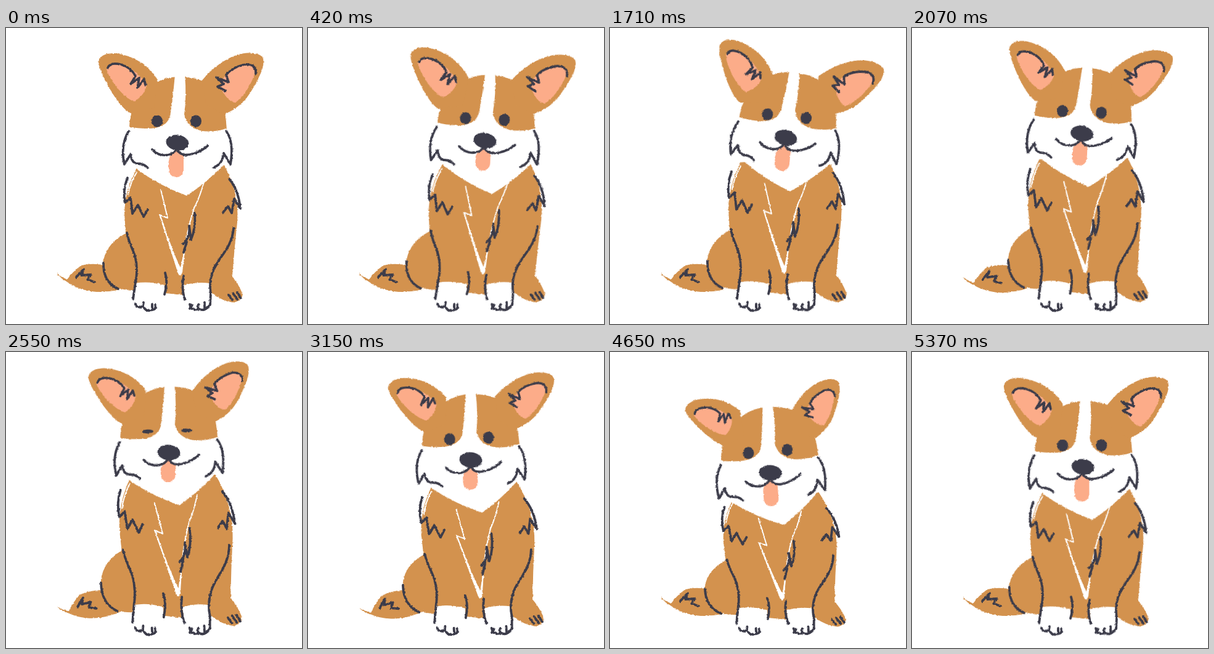
An HTML page for the animation above (5.4 s loop, 480 px wide and 480 px high).

```html
<!DOCTYPE html>
<html lang="en">
<head>
<meta charset="utf-8">
<title>Happy dog</title>
<style>
  html, body { margin: 0; width: 100%; height: 100%; overflow: hidden; background: #fff; }
  svg { display: block; width: 100%; height: 100%; }
  .fur { fill: #d3924e; }
  .white { fill: #fff; }
  .pink { fill: #fcac89; }
  .dark { fill: #3c3c4a; }
  .ink, .hair { fill: none; stroke: #3c3c4a; stroke-width: 3.8; stroke-linecap: round; stroke-linejoin: round; }
  .hair { stroke: #fff; stroke-width: 2; }
</style>
</head>
<body>
<svg viewBox="0 0 480 480">
  <filter id="brush" filterUnits="userSpaceOnUse" x="0" y="0" width="480" height="480" color-interpolation-filters="sRGB">
    <feTurbulence type="fractalNoise" baseFrequency=".3" numOctaves="2" seed="4"/>
    <feDisplacementMap in="SourceGraphic" scale="3" xChannelSelector="R" yChannelSelector="G"/>
  </filter>
  <g filter="url(#brush)">
    <g id="tail">
      <path class="fur" d="M82 397Q90 404 99 408Q108 395 122 385Q142 380 166 386L185 424Q150 432 125 424Q110 420 98 411Q88 406 82 397Z"/>
      <path class="ink" d="M114 404L126 391 122 401 137 400 132 408 144 412"/>
    </g>

    <g id="body">
      <path class="fur" d="M212 228Q193 262 192 300L194 333Q158 352 157 387Q160 426 207 425L258 430 288 433 334 430Q352 444 370 445Q382 442 384 432Q376 413 367 403Q370 360 375 315Q379 265 351 218Z"/>
      <path class="white" d="M209 414Q232 410 257 417L257 434 243 458H205ZM288 417Q310 411 331 414L333 458H292Z"/>
      <path class="hair" d="M212 234Q201 252 198 270M207 236L197 255M251 262L262 308 249 303M321 250Q314 275 305 292Q296 320 292 345L284 394"/>
      <path class="white" d="M248 302L262 345 279 398Q283 405 286 396L292 345 283 389Q270 362 251 304Z"/>
      <path class="ink" d="M197 243Q189 262 193 283L202 275 205 301 214 287 223 306 230 294M362 245Q377 262 380 293L370 277 366 300 360 289 352 299"/>
      <path class="ink" d="M306 300Q308 325 300 343L297 321Q299 340 287 350M293 347L288 364"/>
      <path class="ink" d="M196 332C201 357 212 364 212 392Q212 404 210 412L206 440M258 397Q263 411 257 432M288 402Q284 423 290 440M369 325C366 360 341 374 335 396Q329 413 332 430L331 449M158 381Q157 412 182 423"/>
      <path class="ink" d="M210 447Q211 456 222 451L223 445M223 452Q227 461 237 457L237 448M237 456Q244 458 242 448M298 448Q300 459 311 456L312 448M312 455Q321 461 330 450M298 455L302 449M322 445L322 454"/>
      <path class="ink" d="M361 433L367 441M368 430L375 440M375 429L381 438"/>
    </g>

    <g id="head">
      <path class="fur" d="M200 170Q199 140 211 120Q238 79 281 79Q327 80 346 108Q357 130 358 170Z"/>
      <g id="earL">
        <path class="fur" d="M202 138Q190 133 172 105Q150 68 150 54Q154 40 178 41Q222 47 246 84L240 130Z"/>
        <path class="pink" d="M163 66Q168 55 188 58Q214 70 228 92Q226 108 208 119Q197 116 182 99Q165 78 163 66Z"/>
        <path class="ink" d="M165 65Q168 55 186 59Q203 64 210 78L202 91 216 81 213 97 224 83 226 92"/>
      </g>
      <g id="earR">
        <path class="fur" d="M317 86Q345 52 380 42Q405 37 416 47Q421 58 410 80Q392 117 375 128Q362 137 353 140L325 125Z"/>
        <path class="pink" d="M357 76Q370 60 395 58Q407 60 402 78Q390 108 372 121Q360 120 350 100Q345 88 357 76Z"/>
        <path class="ink" d="M405 74Q406 58 388 59Q366 64 357 76L361 88 341 80 353 91 343 95 356 102"/>
      </g>
      <path class="white" d="M274 76Q270 120 266 143Q260 163 230 163Q212 163 200 160Q184 190 192 217Q203 219 215 231Q250 256 293 272Q325 251 352 223L364 216Q371 185 357 163Q340 169 318 167Q293 162 289 140Q293 110 290 76Z"/>
      <path class="ink" d="M199 167Q185 190 192 221L202 205Q204 220 214 220Q224 220 230 227M357 167Q370 185 364 221L353 203Q351 221 337 226"/>
      <ellipse class="dark eye" cx="245" cy="151" rx="9"/>
      <ellipse class="dark eye" cx="308" cy="151" rx="9"/>
      <path class="pink" id="tongue"/>
      <path class="ink" d="M237 197Q247 208 262 206Q273 204 277 195Q282 210 303 204Q317 200 327 191"/>
      <ellipse class="dark" cx="278" cy="186" rx="18.5" ry="12.5" transform="rotate(8 278 186)"/>
    </g>
  </g>
</svg>
<script>
const LOOP = 5400, STEP = 30;
const $ = id => document.getElementById(id);
const eyes = document.querySelectorAll('.eye');

// time, nose x, nose y, head turn, left ear, right ear, ear size, tongue, lean, stretch, tail
const poses = [
  [0,    278, 185,  0,    0,   0,   1,    57,  0,     1,     0],
  [840,  294, 179,  4.5,  3,   3,   1,    42,  .04,   1.05,  0],
  [1230, 293, 176,  5.3,  6,   5,   1.01, 48,  .03,   1.055, 0],
  [1710, 285, 177,  5.4,  7,   10,  1,    55,  0,     1.045, 0],
  [2550, 264, 162, -1.5, -3,  -3,   .95,  49, -.053,  1.09, -11],
  [3100, 264, 173, -2.2, -6,   5,   .95,  49, -.055,  1.04, -13],
  [3720, 264, 188, -2.7, -3,  -2,   .88,  50, -.053,  .98,  -7],
  [4200, 261, 195, -3.8, -8,  -5,   .87,  52, -.053,  .96,   0],
  [4650, 260, 195, -4.5, -13, -9,   .88,  55, -.053,  .96,   0]
];

const keyAt = i => {
  const n = poses.length, turn = Math.floor(i / n);
  const [t, ...rest] = poses[i - turn * n];
  return [t + turn * LOOP, ...rest];
};

// Smooth curve through the poses, wrapping around the loop
function poseAt(t) {
  let i = 0;
  while (keyAt(i + 1)[0] <= t) i++;
  const [a, b, c, d] = [-1, 0, 1, 2].map(k => keyAt(i + k));
  const span = c[0] - b[0], u = (t - b[0]) / span;
  return b.map((p, k) => {
    const q = c[k];
    const m = (q - a[k]) / (c[0] - a[0]) * span;
    const n = (d[k] - p) / (d[0] - b[0]) * span;
    return p + u * (m + u * (3 * (q - p) - 2 * m - n + u * (2 * (p - q) + m + n)));
  }).slice(1);
}

const smooth = (from, to, t) => {
  const u = Math.min(1, Math.max(0, (t - from) / (to - from)));
  return u * u * (3 - 2 * u);
};

const move = (id, value) => $(id).setAttribute('transform', value);
const turnEar = (id, x, angle, size) =>
  move(id, `translate(${x} 110) rotate(${angle}) scale(${size}) translate(${-x} -110)`);

function draw(t) {
  const [x, y, turn, left, right, size, tongue, lean, stretch, tail] = poseAt(t);
  const floor = 455;
  move('head', `translate(${x - 278} ${y - 185}) rotate(${turn} 278 185)`);
  turnEar('earL', 215, left, size);
  turnEar('earR', 345, right, size);
  move('body', `matrix(1 0 ${-lean} ${stretch} ${lean * floor} ${floor * (1 - stretch)})`);
  move('tail', `rotate(${tail} 165 400)`);
  $('tongue').setAttribute('d',
    `M277 197Q265 203 264 214V${173 + tongue}a12 12 0 0 0 24 0V207Q282 205 277 197Z`);
  const shut = smooth(2380, 2500, t) - smooth(2650, 2800, t);
  eyes.forEach(e => e.setAttribute('ry', 9.8 - 6.6 * shut));
}

function tick() {
  draw(Math.floor(performance.now() % LOOP / STEP) * STEP);
  requestAnimationFrame(tick);
}
tick();
</script>
</body>
</html>
```
